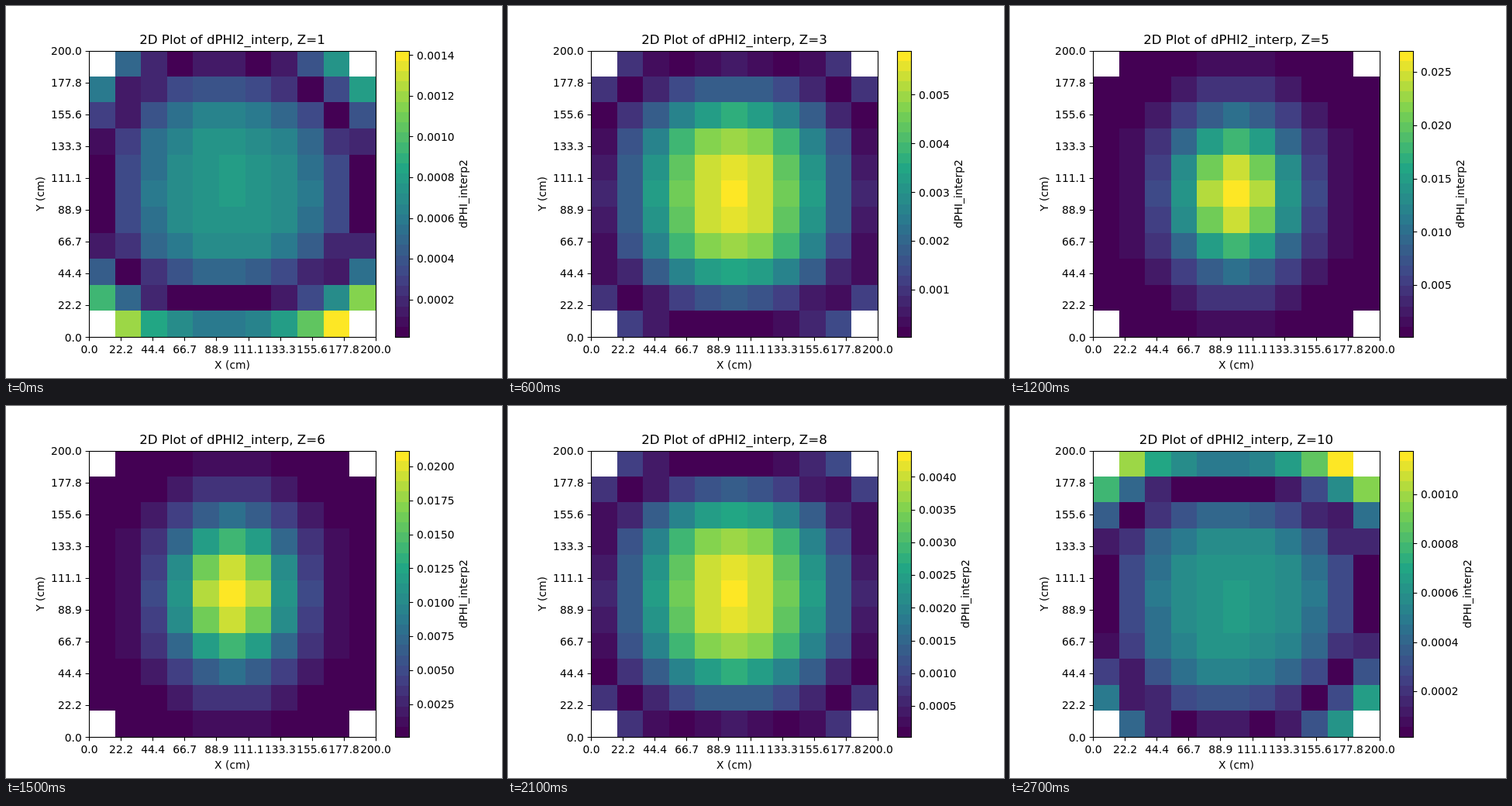
These frames come from a looping animation (640x480 px, 3000 ms). An HTML page:

```html
<!DOCTYPE html>
<html lang="en">
<head>
<meta charset="utf-8">
<title>Heatmap slices</title>
<style>
  html, body { margin: 0; width: 100%; height: 100%; overflow: hidden; background: #fff; }
  svg { display: block; width: 640px; height: 480px; }
  text { font: 13.89px "DejaVu Sans", sans-serif; }
  #title { font-size: 16.67px; }
  .mid { text-anchor: middle; }
  .end { text-anchor: end; }
  .line { fill: none; stroke: #000; stroke-width: 1.11; }
</style>
</head>
<body>
<svg viewBox="0 0 640 480">
  <g id="cells" shape-rendering="crispEdges"></g>
  <g id="bar" shape-rendering="crispEdges"></g>
  <rect class="line" x="107.5" y="58.5" width="370" height="369"/>
  <rect class="line" x="502.5" y="58.5" width="18" height="369"/>
  <g id="axes"></g>
  <g id="scale"></g>
  <text id="title" class="mid" x="292" y="49.3"></text>
  <text class="mid" x="292" y="468">X (cm)</text>
  <text class="mid" transform="translate(49 242.4) rotate(-90)">Y (cm)</text>
  <text id="unit" class="mid">dPHI_interp2</text>
</svg>
<script>
const N = 11, LEFT = 107.2, TOP = 57.6, SIZE = 369.6, BOTTOM = TOP + SIZE;
const BANDS = 28, STEP_MS = 300;
const VIRIDIS = ['440154', '414487', '2a788e', '22a884', '7ad151', 'fde725']
  .map(h => parseInt(h, 16));

// Largest value of each slice, in millionths
const PEAKS = [1422, 2830, 5900, 11675, 27000, 21160, 8290, 4400, 2259, 1177];

const $ = id => document.getElementById(id);
const snap = v => Math.round(v) + .5;

function add(parent, tag, attrs, text = '') {
  const el = document.createElementNS('http://www.w3.org/2000/svg', tag);
  for (const k in attrs) el.setAttribute(k, attrs[k]);
  el.textContent = text;
  parent.append(el);
  return el;
}

function color(v) {
  const last = VIRIDIS.length - 1;
  const band = Math.min(BANDS - 1, Math.floor(v * BANDS));
  const p = band / (BANDS - 1) * last, i = Math.min(last - 1, Math.floor(p));
  const part = s => {
    const a = VIRIDIS[i] >> s & 255, b = VIRIDIS[i + 1] >> s & 255;
    return Math.round(a + (b - a) * (p - i));
  };
  return `rgb(${part(16)},${part(8)},${part(0)})`;
}

// A bell that widens away from the middle slice, minus a rim that grows
// towards the outer slices; x and y run from -1 to 1
function field(z) {
  const d = Math.abs(z - 5.5), side = Math.sign(5.5 - z), far = d ** 4;
  const height = 1.03 - .0012 * far;
  const wx = .24 * 1.62 ** (d - .5), wy = .36 + .075 * (d - .5);
  const power = 1.8 + .4 * d, rim = .014 * d * d;
  const spot = -.2 * Math.sin(Math.PI * (d - .5) / 2);
  return (x, y) => {
    const bell = height * Math.exp(-x * x / wx - Math.abs(y) ** power / wy);
    const tilt = far * (.0006 * side * y ** 3 - .0003 * x * y * y);
    const bump = x || y ? 0 : spot;
    return Math.min(1, Math.abs(bell - rim * (x * x + y * y) ** 2 + tilt + bump));
  };
}

const edgeX = i => Math.round(106.9 + i * 370 / N);
const edgeY = i => Math.max(58, Math.round(57.1 + i * 370 / N));
const cells = [];
for (let row = 0; row < N; row++) {
  for (let col = 0; col < N; col++) {
    if (row % 10 === 0 && col % 10 === 0) continue;
    const left = edgeX(col), top = edgeY(row);
    const el = add($('cells'), 'rect', {
      x: left, y: top, width: edgeX(col + 1) - left, height: edgeY(row + 1) - top
    });
    cells.push({ el, x: (col - 5) / 5, y: (5 - row) / 5 });
  }
}

const bandY = i => Math.max(58, Math.round(BOTTOM - i * SIZE / BANDS));
for (let i = 0; i < BANDS; i++) {
  const y = bandY(i + 1);
  add($('bar'), 'rect', {
    x: 502, y, width: 18, height: bandY(i) - y, fill: color((i + .5) / BANDS)
  });
}

for (let i = 0; i < 10; i++) {
  const x = LEFT + SIZE * i / 9, y = BOTTOM - SIZE * i / 9;
  const label = (200 * i / 9).toFixed(1);
  add($('axes'), 'path', { class: 'line', d: `M${snap(x)} 427.5v4.86M107.5 ${snap(y)}h-4.86` });
  add($('axes'), 'text', { class: 'mid', x: x + .3, y: 448 }, label);
  add($('axes'), 'text', { class: 'end', x: 97.8, y: Math.round(y + 5.3) }, label);
}

function drawScale(hi) {
  const lo = 10 + .0035 * hi;
  const step = [100, 200, 250, 500, 1000, 2000, 2500, 5000].find(s => hi / s < 9.2);
  const digits = String(step / 1e6).length - 2;
  $('scale').replaceChildren();
  for (let v = step; v <= hi; v += step) {
    const y = BOTTOM - SIZE * (v - lo) / (hi - lo);
    add($('scale'), 'path', { class: 'line', d: `M520.5 ${snap(y)}h4.86` });
    add($('scale'), 'text', { x: 530, y: Math.round(y + 5.3) }, (v / 1e6).toFixed(digits));
  }
  const x = 595 + (digits - 4) * 8.84;
  $('unit').setAttribute('transform', `translate(${x} 242.4) rotate(-90)`);
}

let shown = 0;
function draw(z) {
  const value = field(z);
  for (const { el, x, y } of cells) el.setAttribute('fill', color(value(x, y)));
  drawScale(PEAKS[z - 1]);
  $('title').textContent = `2D Plot of dPHI2_interp, Z=${z}`;
  shown = z;
}

function tick() {
  const z = Math.floor(performance.now() / STEP_MS) % 10 + 1;
  if (z !== shown) draw(z);
  requestAnimationFrame(tick);
}
tick();
</script>
</body>
</html>
```
